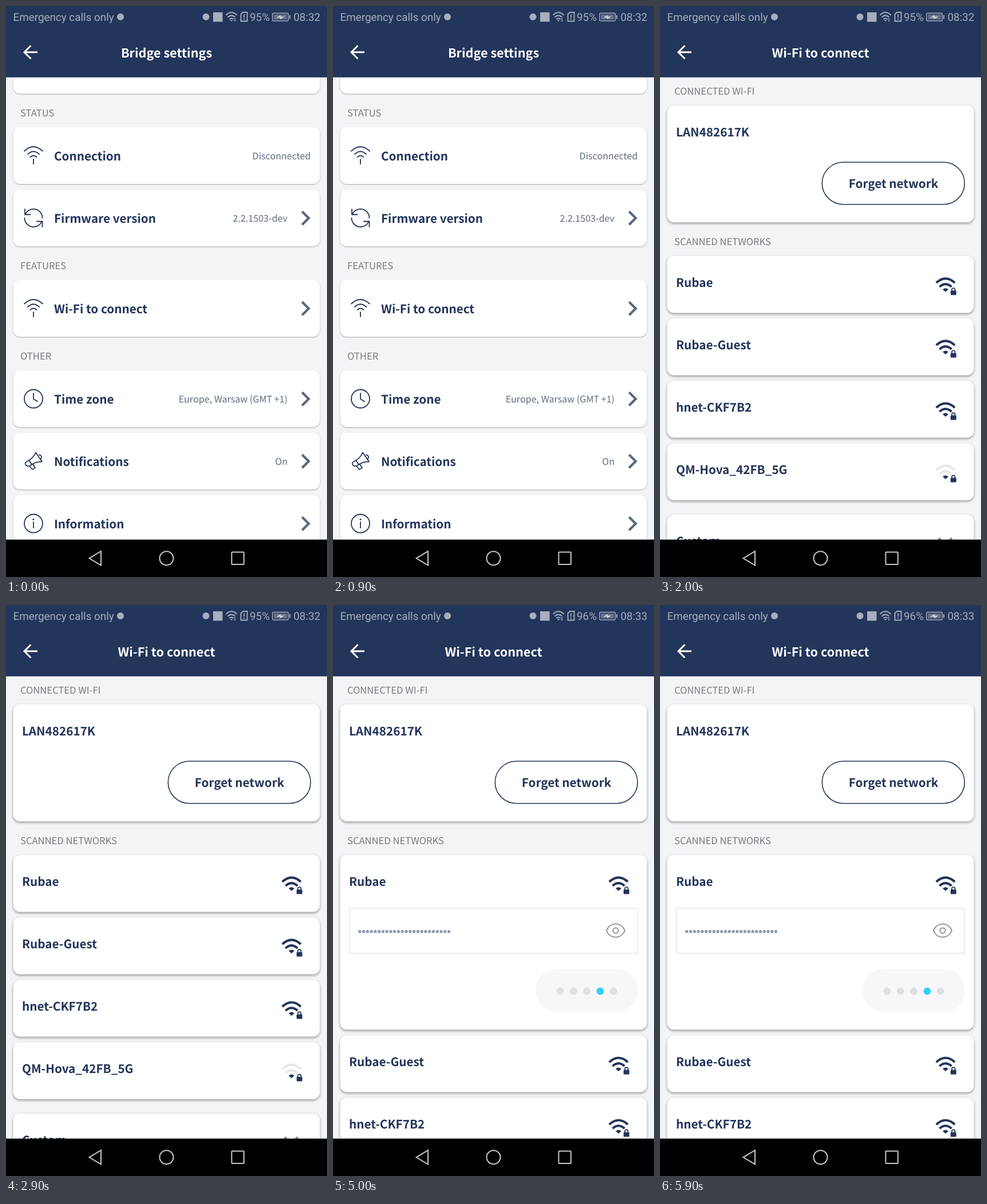
Animation, 561 px wide and 998 px high, one loop 6500 ms. Source, as an HTML page:

```html
<!DOCTYPE html>
<html lang="en">
<head>
<meta charset="utf-8">
<title>Wi-Fi to connect</title>
<style>
html, body { margin: 0; width: 100%; height: 100%; overflow: hidden; background: #f3f4f6; }
svg { display: block; width: 100%; height: 100%; text-rendering: geometricPrecision; }
text { font-family: "Noto Sans CJK JP", "Noto Sans CJK SC", "Noto Sans CJK", sans-serif; }
.title { font-size: 21.6px; font-weight: 700; fill: #fff; text-anchor: middle; }
.label { font-size: 20.7px; font-weight: 700; fill: #22345a; }
.mid { text-anchor: middle; }
.light { fill: #fff; }
.section { font-size: 16.6px; fill: #777b82; }
.value { font-size: 16.1px; font-weight: 300; fill: #5f6b84; text-anchor: end; }
.status text { font: 18.85px Roboto, sans-serif; fill: #a7aebd; }
.card { fill: #fff; filter: drop-shadow(0 1.5px 1.3px rgba(0,0,0,.3)); }
.high .card { filter: drop-shadow(0 2px 2.2px rgba(0,0,0,.4)); }
.line { fill: none; stroke: #22345a; stroke-width: 1.8; stroke-linecap: round; stroke-linejoin: round; }
.chevron { fill: none; stroke: #5a6782; stroke-width: 4.2; }
</style>
</head>
<body>
<svg id="stage" viewBox="0 0 561 998" preserveAspectRatio="none"></svg>
<script>
const NAVY = '#22345a', LOOP = 6500;
const stage = document.getElementById('stage');

const text = (cls, x, y, s) => `<text class="${cls}" x="${x}" y="${y}">${s}</text>`;
const rect = (x, y, w, h, attrs = '') => `<rect x="${x}" y="${y}" width="${w}" height="${h}" ${attrs}/>`;
const path = (d, attrs = 'class="line"') => `<path d="${d}" ${attrs}/>`;
const circle = (x, y, r, attrs = '') => `<circle cx="${x}" cy="${y}" r="${r}" ${attrs}/>`;
const move = (x, y, s) => `<g transform="translate(${x} ${y})">${s}</g>`;
const card = (y, h = 99.6) => rect(12.5, y, 536, h, 'rx="12" class="card"');
const section = (y, s) => text('section', 25, y, s);

// Row icons, centred on 0,0
const ring = circle(0, 0, 16, 'class="line"');
const icons = {
  wifi: path('M-16-8Q0-23 16-8M-10-2.5Q0-12 10-2.5M-5.5 2.5Q0-2.5 5.5 2.5M0 6.5V14.5'),
  sync: path('M-15-15.5V-6H-5.5M-14.5-6A15.6 15.6 0 0 1 15.5 0M15.5 15.5V6H6M14.5 6A15.6 15.6 0 0 1-15.5 0'),
  clock: ring + path('M0-9.5V.5L7 4.5'),
  horn: path('M4-15L15 1Q4 .5-6 8Q-11 10-13 7Q-16 3-12 1Q-1-4 4-15ZM-8-1.5L-3 6M-7 8.5L-2 14.5L3 12L-1 5.5M10-11Q16-10 13-4'),
  info: ring + path('M0-2.5V7.5') + circle(0, -7, 1.4, `fill="${NAVY}"`)
};

function row(y, icon, name, value = '', link = true) {
  return card(y) + move(48, y + 50, icons[icon]) + text('label', 84, y + 58.3, name)
    + text('value', link ? 492 : 532.5, y + 56, value)
    + (link ? path(`M517.5 ${y + 38.7}l11.5 11.5l-11.5 11.5`, 'class="chevron"') : '');
}

function signal(y, weak) {
  const arcs = 'M482.8 47Q499 32 515.2 47M488.5 54Q499 44.5 509.5 54';
  return move(0, y, path(arcs, `fill="none" stroke="${weak ? '#e6e8eb' : NAVY}" stroke-width="4"`)
    + path('M494 58.5Q499 54.5 504 58.5L499 63Z', `fill="${NAVY}"`)
    + rect(507.8, 60.5, 10, 8, `rx="1.5" fill="${NAVY}" stroke="#fff" stroke-width="2" paint-order="stroke"`)
    + path('M510 61V59a2.8 2.8 0 0 1 5.6 0V61', `fill="none" stroke="${NAVY}" stroke-width="1.7"`));
}

const network = (y, name, h, weak) => card(y, h) + text('label', 28, y + 54, name) + signal(y, weak);

const settings = card(60, 93.3)
  + section(193, 'STATUS')
  + row(211.5, 'wifi', 'Connection', 'Disconnected', false)
  + row(320.5, 'sync', 'Firmware version', '2.2.1503-dev')
  + section(460, 'FEATURES')
  + row(478.5, 'wifi', 'Wi-Fi to connect')
  + section(618, 'OTHER')
  + row(636.5, 'clock', 'Time zone', 'Europe, Warsaw (GMT +1)')
  + row(745.5, 'horn', 'Notifications', 'On')
  + row(854.5, 'info', 'Information');

const skeleton = [150, 333.7].map(y =>
  rect(25, y, 171, 25, 'fill="#eaeaea"')
  + rect(12.5, y + 50, 536, 99.5, 'fill="#eaeaea"')
  + rect(28, y + 84, 227, 25, 'fill="#d8d8d8"')).join('');

const connected = section(155.3, 'CONNECTED WI-FI')
  + card(173.5, 204.7) + text('label', 28, 228.3, 'LAN482617K')
  + rect(283.3, 273, 249, 73.7, `rx="36.8" fill="#fff" stroke="${NAVY}" stroke-width="1.6"`)
  + text('label mid', 408, 318, 'Forget network')
  + section(418.3, 'SCANNED NETWORKS');

const list = connected
  + network(436.8, 'Rubae')
  + network(545.9, 'Rubae-Guest')
  + network(655, 'hnet-CKF7B2')
  + network(764.1, 'QM-Hova_42FB_5G', undefined, true)
  + card(889) + text('label', 28, 943, 'Custom')
  + path('M487 930l11.5 11.5l11.5-11.5', 'fill="none" stroke="#8b8e94" stroke-width="4"');

function form(busy) {
  const dots = [0, 1, 2, 3, 4].map(i =>
    circle(397 + i * 23.3, 675, 6.4, `fill="${i === 3 ? '#30ceff' : '#dfe0e2'}"`)).join('');
  return connected
    + network(436.8, 'Rubae', 305.4)
    + rect(28.5, 530, 504, 78.5, 'fill="#fff" stroke="#e3e4e6" stroke-width="1.3"')
    + path('M46.8 570.7H202.6', `stroke="${busy ? '#9099ad' : NAVY}" stroke-width="5.4" stroke-linecap="round" stroke-dasharray="0 6.77"`)
    + `<g fill="none" stroke="#8c8d92" stroke-width="1.8">${path('M478 569C484 553.5 504 553.5 510 569C504 584.5 484 584.5 478 569Z', '')
      + circle(494, 569, 4.7)}</g>`
    + rect(353.8, 636.5, 179, 74.5, `rx="37" fill="${busy ? '#f6f7f9' : NAVY}"`)
    + (busy ? dots : text('label mid light', 443.5, 682, 'Connect'))
    + network(752, 'Rubae-Guest')
    + network(861, 'hnet-CKF7B2');
}

function chrome(title, charge, clock) {
  const tint = '#a7aebd', solid = `fill="${tint}"`;
  const stroke = w => `fill="none" stroke="${tint}" stroke-width="${w}"`;
  return rect(0, 0, 561, 124.7, 'fill="#22355b"')
    + '<g class="status">' + text('', 12.5, 26, 'Emergency calls only')
    + circle(200, 19, 6, solid)
    + circle(349.5, 19, 6, solid)
    + rect(362, 11, 16.5, 16.5, solid)
    + path('M384.5 16Q394 6.5 403.5 16M387.5 19.7Q394 13.5 400.5 19.7M390.5 23Q394 20 397.5 23', stroke(2))
    + path('M394 27l-2.5-2.5h5ZM398 23.5l2 -2.5 2 2.5ZM398 25l2 2.5 2-2.5Z', solid)
    + path('M414 11H421.5V26.5H410.5V14.5ZM416 14.5V20.5M416 22V24', stroke(1.9))
    + text('', 426, 26, charge + '%')
    + rect(465.8, 12.5, 27.5, 13.5, `rx="2" ${stroke(1.4)}`)
    + rect(468, 14.7, 23, 9, `${solid} opacity=".5"`)
    + path('M472 20.5L480 16V18.5H487L479 23V20.5Z', 'fill="#d3d7e0"')
    + rect(495, 16, 2, 6.5, solid)
    + text('', 502.5, 26, clock) + '</g>'
    + path('M55 80.7H32.5M43.5 69.2L32 80.7L43.5 92.2', 'fill="none" stroke="#fff" stroke-width="3"')
    + text('title', 280.5, 89.5, title)
    + rect(0, 932.6, 561, 66)
    + `<g fill="none" stroke="#c9c9c9" stroke-width="2">${path('M145.5 965.3L166 953V977.6Z', '')
      + circle(280.5, 965.3, 12) + rect(394.4, 954.6, 21.4, 21.4, 'rx="1"')}</g>`;
}

const scene = (start, cls, body, title, charge, clock) =>
  ({ start, html: `<rect width="561" height="998" fill="#f3f4f6"/><g class="${cls}">${body}</g>` + chrome(title, charge, clock) });

const WIFI = 'Wi-Fi to connect';
const scenes = [
  scene(0, '', settings, 'Bridge settings', 95, '08:32'),
  scene(1500, '', skeleton, WIFI, 95, '08:32'),
  scene(2000, 'high', list, WIFI, 95, '08:32'),
  scene(3500, 'high', form(false), WIFI, 95, '08:33'),
  scene(5000, 'high', form(true), WIFI, 96, '08:33')
];

let shown;
function draw() {
  const t = performance.now() % LOOP;
  const next = scenes.findLast(s => t >= s.start);
  if (next !== shown) stage.innerHTML = (shown = next).html;
  requestAnimationFrame(draw);
}
draw();
</script>
</body>
</html>
```
